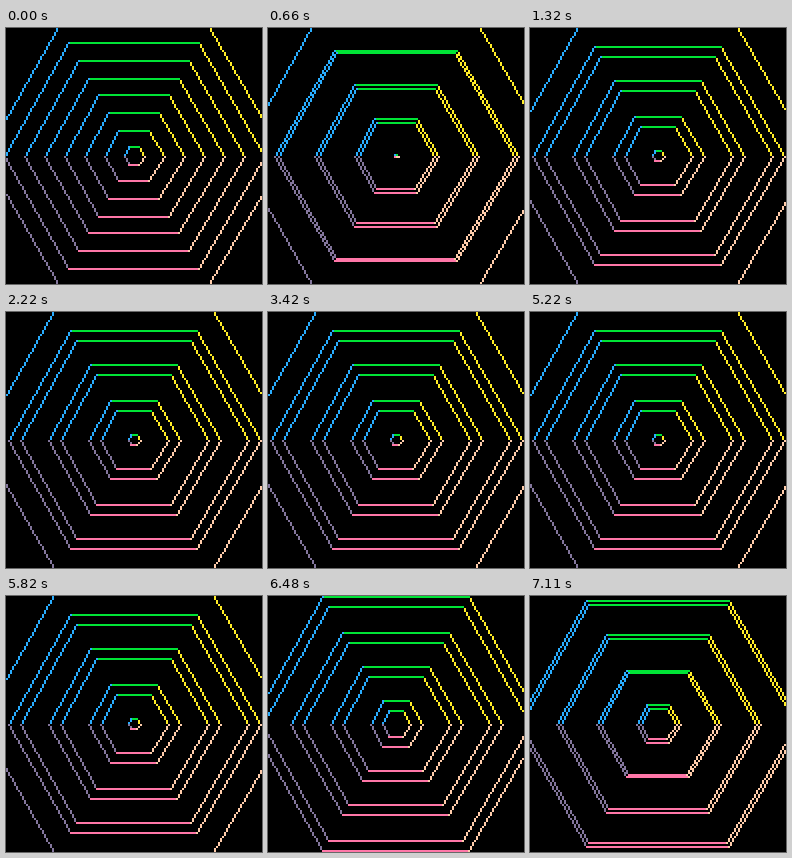
Recreate the animation shown at these times as an HTML page with a canvas. Size 256 by 256 pixels, loop 7.17 s.

```html
<!DOCTYPE html>
<html lang="en">
<head>
<meta charset="utf-8">
<title>Hexagon rings</title>
<style>
  html, body { margin: 0; width: 100%; height: 100%; overflow: hidden; background: #000; }
  canvas { display: block; width: 100vw; height: 100vh; image-rendering: pixelated; }
</style>
</head>
<body>
<canvas id="stage" width="256" height="256"></canvas>
<script>
const ctx = document.getElementById('stage').getContext('2d');
const LOOP = 7170, TICK = 30;
const PX = 2, MID = 64;
const GAP = 20, RINGS = 4, SPEED = 2;
// Sides run counter-clockwise from the right-hand corner.
const COLORS = ['#ffec27', '#00e436', '#29adff', '#83769c', '#ff77a8', '#ffccaa'];

const mod = (a, n) => ((a % n) + n) % n;
const snap = v => Math.floor(v + 1e-6);

function corner(r, i) {
  const a = i * Math.PI / 3;
  return [snap(MID + r * Math.cos(a)), snap(MID - r * Math.sin(a))];
}

// Hard-edged line on the 128 x 128 grid.
function line([x0, y0], [x1, y1], color) {
  const dx = x1 - x0, dy = y1 - y0;
  const steps = Math.max(Math.abs(dx), Math.abs(dy));
  ctx.fillStyle = color;
  for (let i = 0; i <= steps; i++) {
    const k = steps ? i / steps : 0;
    const x = Math.floor(x0 + dx * k + 0.5 + 1e-9);
    const y = Math.floor(y0 + dy * k + 0.5 + 1e-9);
    ctx.fillRect(x * PX, y * PX, PX, PX);
  }
}

function hexagon(r) {
  COLORS.forEach((color, i) => line(corner(r, i), corner(r, i + 1), color));
}

function draw(time) {
  const tick = Math.floor((time % LOOP) / TICK);
  const shift = 5 - SPEED * tick;
  ctx.fillStyle = '#000';
  ctx.fillRect(0, 0, 256, 256);
  // One set of rings shrinks while the other grows.
  for (let k = 0; k < RINGS; k++) {
    hexagon(k * GAP + mod(shift, GAP));
    hexagon(k * GAP + mod(-shift, GAP));
  }
}

const start = performance.now();
function loop() {
  draw(performance.now() - start);
  requestAnimationFrame(loop);
}
loop();
</script>
</body>
</html>
```
